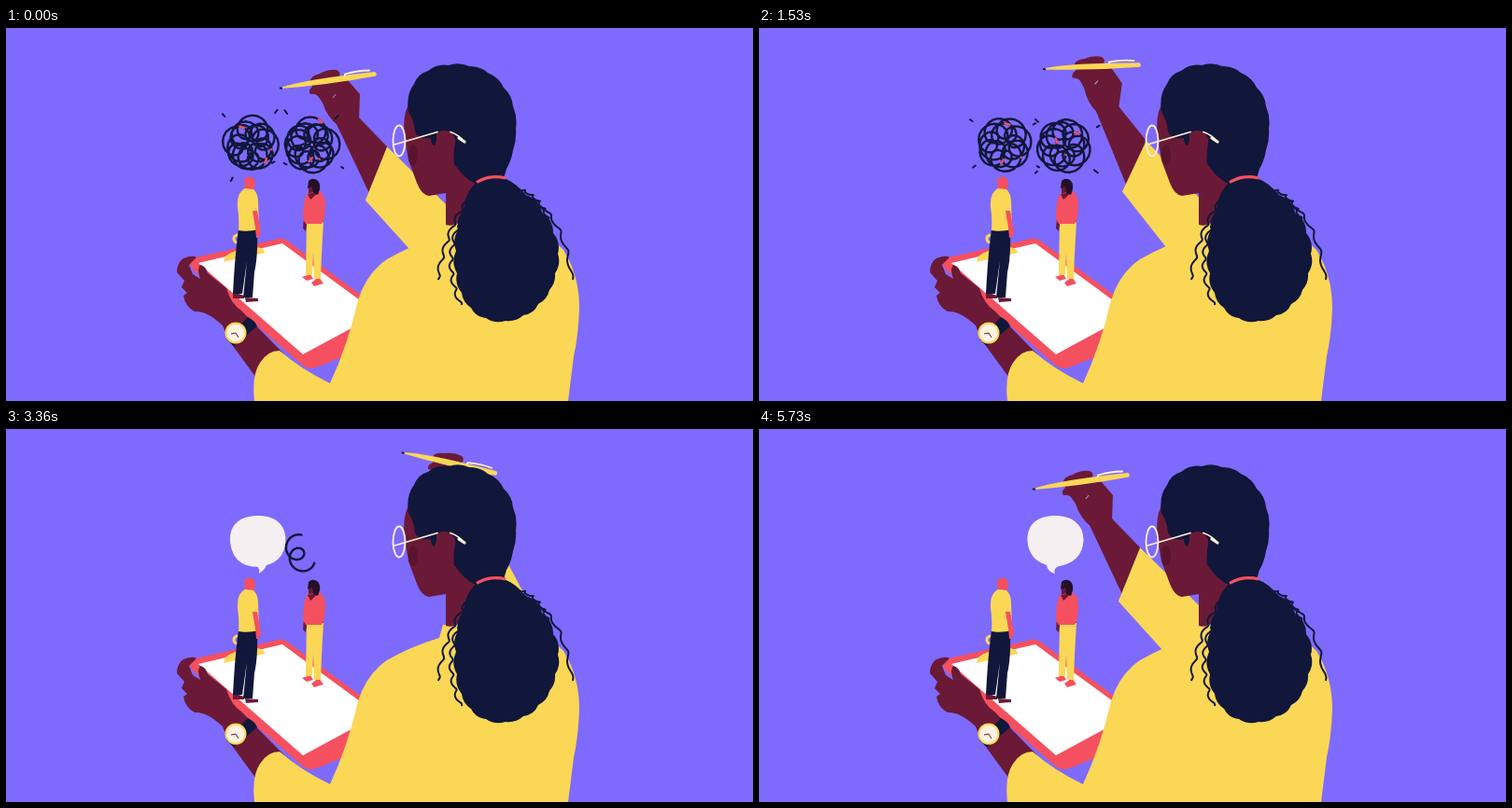
Recreate the animation shown at these times as an HTML page. Size 800x400 px, loop 5760 ms.

```html
<!DOCTYPE html>
<html lang="en">
<head>
<meta charset="utf-8">
<title>Untangling a conversation</title>
<style>
html, body { margin: 0; width: 100%; height: 100%; overflow: hidden; background: #7f6afe; }
svg { display: block; width: 100vw; height: 100vh; }
.skin { fill: #6a1a36; }
.gold { fill: #fbd756; }
.navy { fill: #10173a; }
.red { fill: #f5505f; }
.line { fill: none; stroke: #10173a; stroke-width: 2; stroke-linecap: round; stroke-linejoin: round; }
.knot { stroke-width: 2.4; }
.spot { stroke: #f5505f; stroke-dasharray: 0 75 5 190 5 2000; }
.cream { fill: none; stroke: #fdf0da; stroke-width: 1.8; stroke-linecap: round; }
.bubble { fill: #f6eff1; animation: 5760ms linear infinite; }
#sayLeft { transform-origin: 273px 154px; animation-name: sayLeft; }
#sayRight { transform-origin: 315px 154px; animation-name: sayRight; }
@keyframes sayLeft {
  0%, 41.7% { transform: scale(0); animation-timing-function: ease-out; }
  44.8% { transform: scale(1.06); animation-timing-function: ease-in-out; }
  48%, 83% { transform: scale(1); animation-timing-function: ease-in; }
  86%, 100% { transform: scale(0); }
}
@keyframes sayRight {
  0%, 86% { transform: scale(0); animation-timing-function: ease-out; }
  89.5% { transform: scale(1.06); animation-timing-function: ease-in-out; }
  92%, 100% { transform: scale(1); }
}
</style>
</head>
<body>
<svg viewBox="0 0 800 400" preserveAspectRatio="none">
  <rect width="800" height="400" fill="#7f6afe"/>

  <!-- raised arm -->
  <path id="forearm" class="skin"/>
  <g id="hand">
    <path class="skin" d="M326 56Q327 51 336 49Q345 44 354 45Q359 47 357 51L367 57Q374 65 379 71L378 99Q368 108 356 105Q344 96 339 80L334 73Q331 70 326 71Q323 67 328 63Z"/>
    <path class="gold" d="M294 64Q320 55 395 47Q398 49 396 51.500Q345 61 294 65Z"/>
    <path class="navy" d="M293 63.500h3v2h-3z"/>
    <path class="cream" d="M363 51V49.500Q377 45.500 389 45.500"/>
    <path d="M350 75l3-4" stroke="#b9a4d8"/>
  </g>
  <path id="sleeve" class="gold"/>

  <!-- clipboard -->
  <path class="red" d="M194 250Q196 246 203 246L294 225.500Q297 225 301 228L392 295V340L332 364Q324 367 317 361L201 260Z"/>
  <path fill="#fff" d="M206 252L296 231L390 300V311L318 350Z"/>
  <path class="gold" d="M233 251Q234 242 246 239L268 235Q277 236 277 241Z"/>
  <circle cx="248" cy="226" r="4" fill="none" stroke="#fbd756" stroke-width="3"/>

  <!-- man -->
  <path class="skin" d="M243 283l12 4v3h-12zM256 289l14 1v3l-13 1z"/>
  <path class="navy" d="M249 216L269 215Q270 245 266 262L264 289H254L258 250L253 285H243Q245 245 249 216Z"/>
  <path class="red" d="M255 165Q256 159 262 159.500Q267 161 267 168L265 174H256Z"/>
  <path class="gold" d="M256 172L265 173Q270 178 270 186L271 216Q259 219 249 217Q250 204 248 192Q247 176 256 172Z"/>
  <path class="red" d="M264 196H269L273 218Q272 226 268 225L267 214Z"/>

  <!-- woman -->
  <path class="red" d="M317 267l9-3 3 5-7 2zM327 273l8-6 5 7-10 3z"/>
  <path class="skin" d="M319 204l-1 11 3 3 2-12zM335 204v16l3 2 2-18zM324 167h8v14h-8z"/>
  <path class="gold" d="M322 208H340Q339 224 338 243L337 269H330L329 241L328 265H321Z"/>
  <path class="red" d="M322 178L334 175Q342 177 342 188L341 204L338 210H321L318 205Q318 186 322 178Z"/>
  <path class="skin" d="M323 178L334 176Q329 182 326 184Z"/>
  <path fill="#241028" d="M324 164Q328 160 333 163Q337 166 336 173L334 179L329 177L328 170L323 172Z"/>

  <!-- holding hand and watch -->
  <path class="skin" d="M183 262Q183 252 190 247Q200 243 204 246L196 254L200 264L208 269Q204 258 208 254Q214 255 216 263L236 279Q241 296 252 303L298 350L273 382L238 334L232 319Q215 303 202 304Q192 299 190 287L194 284L188 278L191 271Z"/>
  <path class="navy" d="M236 334L259 310Q267 314 269 320L244 341Z"/>
  <circle cx="246" cy="327" r="10.500" fill="#fdf3e2" stroke="#fbd756" stroke-width="2"/>
  <path d="M241 328L246 327L249 332" fill="none" stroke="#6a1a36"/>

  <!-- body -->
  <path class="gold" d="M266 400Q263 372 272 359Q280 346 293 346Q316 366 347 381Q366 340 377 292Q386 263 408 248Q434 233 464 224L468 210H540Q580 220 597 238Q614 265 614 300Q613 330 608 352L602 400Z"/>

  <!-- head -->
  <path class="skin" d="M431 82Q424 96 427 118L431 142L440 166Q445 179 453 180L471 177V211Q484 215 492 196L510 165L500 90Z"/>
  <ellipse cx="436" cy="136" rx="5" ry="11" fill="#5a142d"/>
  <path class="navy" d="M431 90Q428 72 437 60Q441 49 452 46Q462 38 474 40Q485 36 496 41Q508 41 516 48Q528 53 533 64Q542 72 543 84Q548 96 546 108Q547 120 543 131Q541 143 536 151L531 168H505Q494 163 488 156L480 146L475 113Q467 108 461 113Q462 120 459 126Q455 125 455 118Q441 120 438 111Q437 99 431 90Z"/>
  <path class="skin" d="M461 114Q465 108 475 111Q484 116 480 129L479 149L462 146Z"/>
  <ellipse class="cream" cx="421" cy="121" rx="6.500" ry="16.500"/>
  <path class="cream" d="M416 125L462 111.500M476 111.500Q484 114 491 122"/>
  <path class="cream" d="M485 118L491 122" style="stroke-width:3.2"/>

  <!-- ponytail -->
  <path class="navy" d="M503 166Q491 178 490 196A24 24 0 0 0 484 217A24 24 0 0 0 482 239A26 26 0 0 0 483 263A24 24 0 0 0 488 284A22 22 0 0 0 498 300A20 20 0 0 0 514 311A24 24 0 0 0 535 314A24 24 0 0 0 554 308A20 20 0 0 0 570 296A22 22 0 0 0 582 281A24 24 0 0 0 588 263A24 24 0 0 0 591 242A24 24 0 0 0 586 220A24 24 0 0 0 574 198A24 24 0 0 0 556 179Q547 166 533 161Z"/>
  <path id="strands" class="line"/>
  <path d="M504 165.500Q518 157 535 161" fill="none" stroke="#f5505f" stroke-width="3.200"/>

  <!-- thoughts and speech -->
  <path id="knotL" class="line knot"/>
  <path id="spotL" class="line knot spot"/>
  <path id="knotR" class="line knot"/>
  <path id="spotR" class="line knot spot"/>
  <path id="ticks" class="line"/>
  <path id="curls" class="line knot" d="M219 92q3-2 5 1t3 4q-3 2-5-2M213 138q-1-4 3-4t3 2q-2 2-4 1"/>
  <path id="sayLeft" class="bubble" d="M240 121C239 102 251 93 270 93S300 103 299.500 120Q298 141 279 146Q277 151 271 155Q272 151 270 148Q243 148 240 121Z"/>
  <path id="sayRight" class="bubble" d="M287.500 120C287 102 298 93 317 93S348 103 347.500 120Q346 143 320 147.500Q315 150 317 155Q309 153 308 146Q289 140 287.500 120Z"/>
</svg>
<script>
const LOOP = 5760, TAU = Math.PI * 2;
const el = id => document.getElementById(id);
const show = (id, d) => el(id).setAttribute("d", d);
const mix = (a, b, k) => a + (b - a) * k;
const clamp = k => Math.max(0, Math.min(1, k));
const span = (t, a, b) => clamp((t - a) / (b - a));
const polar = (x, y, r, a) => [x + r * Math.cos(a), y + r * Math.sin(a)];
const ease = { in: k => k * k, out: k => k * (2 - k), both: k => k * k * (3 - 2 * k) };

function random(seed) {
  return () => {
    seed = (seed * 16807 + 11) % 2147483647;
    return seed / 2147483647;
  };
}

function trace(point, steps) {
  let d = "";
  for (let i = 0; i <= steps; i++) d += (i ? "L" : "M") + point(i / steps).map(v => v.toFixed(1));
  return d;
}

// palm x, palm y, turn of the hand
const pose = {
  ready: [365, 70, 0], lift: [375, 57, 6], high: [383, 46, 9], strike: [336, 90, -14],
  pull: [436, 74, 21], over: [497, 45, 24], rest: [489, 56, 21]
};
const moves = [
  [0, "ready"], [1260, "ready", "in"], [1530, "lift", "out"], [1830, "high"],
  [2160, "strike", "in"], [2610, "pull", "out"], [2820, "over"], [3060, "rest"],
  [4920, "rest"], [5520, "ready"], [LOOP, "ready"]
];

function handAt(t) {
  const i = moves.findIndex(m => m[0] > t);
  const [from, a, curve = "both"] = moves[i - 1], [to, b] = moves[i];
  const k = ease[curve](span(t, from, to));
  return pose[a].map((v, n) => mix(v, pose[b][n], k));
}

// where a point of the ready hand is now
function onHand([px, py, turn], x, y) {
  const dx = x - 365, dy = y - 70;
  return polar(px, py, Math.hypot(dx, dy), Math.atan2(dy, dx) + turn * TAU / 360);
}

// the sleeve follows the palm: the further right, the flatter its cuff
function drawArm(hand) {
  const [px, py, turn] = hand, dx = px - 365, right = Math.max(dx, 0);
  const cx = 396.5 + dx * (.5 + .0037 * dx), cy = 156 + (py - 70) * .6;
  const half = 31 - .08 * right, tilt = (-68 + .32 * dx) * TAU / 360;
  const top = polar(cx, cy, half, tilt), low = polar(cx, cy, -half, tilt);
  const base = [432 + .47 * dx, 237 - .1 * dx];
  el("hand").setAttribute("transform", `translate(${px} ${py}) rotate(${turn}) translate(-365 -70)`);
  show("forearm", `M${onHand(hand, 378, 96)}L${top}L${cx + 12} ${cy}L${polar(cx, cy, -half * .7, tilt)}L${onHand(hand, 353, 101)}Z`);
  show("sleeve", `M${top}L${low}L${base}l45 15L${472 + .83 * right} ${190 + .2 * right}Z`);
}

// round coils laid around a centre, different for every seed
function coil(cx, cy, seed) {
  const rnd = random(seed * 7919), turns = 2, loops = 13 + seed % 3 * 2;
  const phase = rnd() * TAU, sway = rnd() * TAU;
  return s => {
    const u = s * TAU;
    const [x, y] = polar(cx, cy, 16 + 3 * Math.sin(3 * u + sway), turns * u + phase);
    return polar(x, y, 11 + 2 * Math.cos(5 * u + sway), loops * u);
  };
}

function ring(s) {
  const u = -.75 - s * 5.4, curl = 5 + 3 * Math.sin(u * 3);
  const [x, y] = polar(265, 119, 23, u);
  return polar(x, y, curl, 10 * u);
}

function ticksAround(cx, cy, seed) {
  const rnd = random(seed * 5471);
  let d = "";
  for (let i = 0; i < 4; i++) {
    const a = (i + .3 + .5 * rnd()) * TAU / 4, r = 37 + 6 * rnd(), len = 2 + 3 * rnd();
    d += `M${polar(cx, cy, r, a)}L${polar(cx, cy, r + len, a)}`;
  }
  return d;
}

const left = [0, 1, 2].map(i => coil(262, 125, i + 1));
const right = [0, 1, 2].map(i => coil(326, 126, i + 4));

function drawThoughts(t, hand) {
  const beat = Math.floor(t / 90) % 3, beatR = t < 1920 ? beat : 1;

  // left: opens into a ring, then follows the pen
  const open = ease.both(span(t, 1980, 2150)), pull = span(t, 2150, 2430);
  const tip = onHand(hand, 294, 64);
  const leftPath = pull < 1 ? trace(s => {
    const p = left[beat](s), q = ring(s), k = ease.both(clamp(pull * 2.2 - s * 1.2));
    return p.map((v, n) => mix(mix(v, q[n], open), tip[n], k));
  }, 240) : "";
  show("knotL", leftPath);
  show("spotL", open ? "" : leftPath);

  // right: unwinds to nothing
  const rest = 1 - span(t, 3120, 3390);
  const rightPath = rest ? trace(s => right[beatR](s * rest), 240) : "";
  show("knotR", rightPath);
  show("spotR", t < 2400 ? rightPath : "");

  show("ticks", (open ? "" : ticksAround(262, 125, beat + 1)) + (rest === 1 ? ticksAround(326, 126, beatR + 4) : ""));
  el("curls").style.display = t >= 2040 && t < 2310 ? "" : "none";
}

// a wavy hair along a quadratic curve
function strand(x0, y0, cx, cy, x1, y1) {
  const along = (a, b, c, s) => mix(mix(a, b, s), mix(b, c, s), s);
  return trace(s => [along(x0, cx, x1, s) + 2 * Math.sin(s * 34), along(y0, cy, y1, s) + Math.cos(s * 34)], 60);
}
show("strands", strand(498, 180, 472, 212, 462, 270) + strand(484, 212, 468, 255, 487, 297)
  + strand(545, 175, 597, 190, 606, 270) + strand(540, 170, 572, 176, 580, 205));

function frame() {
  const t = performance.now() % LOOP, hand = handAt(t);
  drawArm(hand);
  drawThoughts(t, hand);
  requestAnimationFrame(frame);
}
frame();
</script>
</body>
</html>
```
